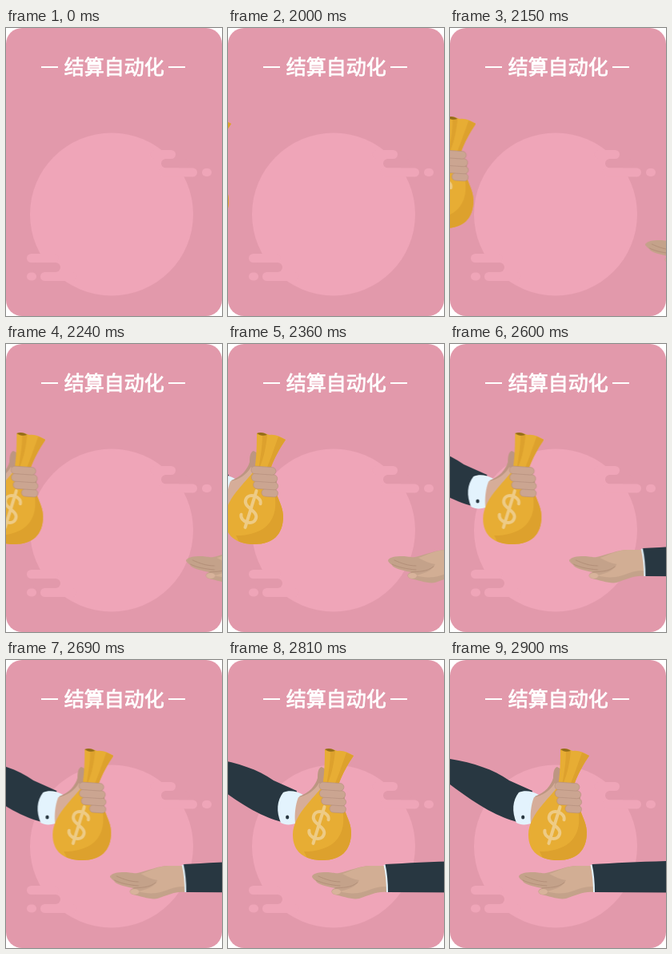
Animation, 270 px wide and 361 px high, one loop 4.57 s. Source, as an HTML page:

```html
<!DOCTYPE html>
<html lang="zh-CN">
<head>
<meta charset="utf-8">
<title>结算自动化</title>
<style>
  html, body { margin: 0; width: 100%; height: 100%; overflow: hidden; background: #fff; }
  svg { display: block; width: 100%; height: 100%; }
  .title { font: 25px "Noto Sans CJK SC", "Noto Sans CJK", sans-serif; fill: #fff; stroke: #fff; stroke-width: .8; }
  .card { fill: #e299ab; }
  .glow { fill: #efa5b8; }
  .suit { fill: #283741; }
  .cuff { fill: #e3f3fd; }
  .skin { fill: #d2ae94; }
  .wrist { fill: #d6ad99; }
  .shade { fill: #c4a28a; }
  .back { fill: #bd9682; }
  .crease { fill: none; stroke: #b18e78; stroke-width: .9; stroke-linecap: round; }
  .fingers rect { fill: #cba591; stroke: #b58f7d; stroke-width: .6; }
  .gold { fill: #e7ad34; }
  .goldShade { fill: #dda12d; }
  .dollar { fill: none; stroke: #eecb85; stroke-width: 4; stroke-linecap: round; }
</style>
</head>
<body>
<svg viewBox="0 0 270 361">
  <defs>
    <clipPath id="cardClip"><rect width="270" height="361" rx="20"/></clipPath>
    <clipPath id="bagClip"><use href="#bagBody"/></clipPath>
    <path id="bagBody" d="M136 156C131 168 98 192 98 219C98 241 113 251 135 251C158 251 171 239 171 216C171 200 158 186 154 156Z"/>
  </defs>

  <g clip-path="url(#cardClip)">
    <rect class="card" width="270" height="361"/>
    <circle class="glow" cx="132" cy="233.5" r="102"/>

    <!-- clouds on the rim of the circle -->
    <rect class="card" x="194" y="164" width="36" height="11.5" rx="5.7"/>
    <g class="glow">
      <rect x="180" y="153" width="32" height="11" rx="5.5"/>
      <rect x="190" y="175.5" width="49" height="11" rx="5.5"/>
      <rect x="245" y="176" width="12" height="10" rx="5"/>
    </g>
    <rect class="card" x="32" y="294" width="36" height="12" rx="6"/>
    <g class="glow">
      <rect x="26" y="283" width="40" height="11" rx="5.5"/>
      <rect x="43" y="306" width="46" height="11" rx="5.5"/>
      <rect x="26" y="306.5" width="12" height="10" rx="5"/>
    </g>

    <path d="M44 49H65M203 49H224" stroke="#fff" stroke-width="2"/>
    <text class="title" x="135.3" y="58.3" text-anchor="middle">结算自动化</text>

    <g id="giver">
      <path class="suit" d="M0 124C30 129 54 137 74 151L103 164L98 190L84 203C62 197 38 185 0 156Z"/>
      <path class="cuff" d="M86 166C93 163 103 164 111 169C104 178 102 192 101 205C95 207 88 207 83 204C77 190 78 176 86 166Z"/>
      <ellipse class="suit" cx="91.2" cy="197" rx="2.1" ry="2.6"/>
      <path class="back" d="M106 171C119 166 126 158 129 148C129 141 130 135 134 134L141 138L139 168L116 186Z"/>
      <path class="wrist" d="M105 172C116 170 125 164 131 154L138 166L114 192L101 205C100 194 101 182 105 172Z"/>

      <path class="gold" d="M138 112C145 110 150 113 154 114C161 113 167 116 174 120C167 130 160 143 156 154L155 164L134 162C137 150 138 134 138 112Z"/>
      <use href="#bagBody" class="gold"/>
      <g clip-path="url(#bagClip)">
        <path class="goldShade" d="M158 178C169 217 152 240 112 240L120 257H178V178Z"/>
      </g>
      <path class="goldShade" d="M165 116L174 120C167 130 160 143 156 154L150 157C156 142 160 130 165 116ZM145 114L151 115C149 132 146 146 140 158C142 144 145 130 145 114Z"/>
      <path d="M138 112C142 110 148 111 151 114C147 115.5 142 115 138 112Z" fill="#946d18"/>

      <g class="dollar" transform="translate(130.5 207) rotate(17)">
        <path d="M9.5-10C9-19-9.5-20-9.5-9C-9.5 1 9.5-1 9.5 9C9.5 20-9 19-9.5 10M0-24V24"/>
      </g>

      <path class="back" d="M140 156H156L163 172L162 188H150Z"/>
      <g class="fingers" transform="rotate(4 148 172)">
        <rect x="145" y="181.5" width="20.5" height="9.5" rx="4.7"/>
        <rect x="134" y="172.5" width="31" height="9.5" rx="4.7"/>
        <rect x="131" y="163" width="32.5" height="10" rx="5"/>
        <rect x="130" y="154" width="31" height="9.5" rx="4.7"/>
      </g>
    </g>

    <g id="taker">
      <path class="shade" d="M86 271C88 267 95 266 104 266C112 266 115 268 120 267C134 264 146 258 159 258L179 258V291C167 290 158 295 145 299C137 301 124 296 114 294C109 292 109 288 115 286C104 284 92 281 91 277C88 275 86 273 86 271Z"/>
      <path class="skin" d="M124 268C136 264 147 258 159 258L179 258V284C166 283 156 290 144 292C135 293 127 292 120 290C132 288 141 284 145 276C139 275 131 272 124 268Z"/>
      <path class="crease" d="M91 276C99 280 109 282 121 283M94 271C103 275 111 278 121 278M115 286C124 285 134 286 143 279"/>
      <ellipse cx="116.5" cy="290.5" rx="5.5" ry="3.4" fill="#d8b39b"/>
      <path class="cuff" d="M175.5 257L179 256L182 291H179C179 279 178 268 175.5 257Z"/>
      <path class="suit" d="M177.5 256C205 254.5 235 253 270 252V291.5L181 291C181 279 180 267 177.5 256Z"/>
    </g>
  </g>
</svg>

<script>
  const LOOP = 4570, ENTER = 1999.5, ARRIVE = 2899.5, STEPS = 30;

  // Parked out of sight, then an even, stepped slide into place.
  function slideIn(id, from) {
    const at = (x, ms, easing = 'linear') =>
      ({ transform: `translateX(${x}px)`, offset: ms / LOOP, easing });
    document.getElementById(id).animate([
      at(Math.sign(from) * 300, 0, 'step-end'),
      at(from, ENTER, `steps(${STEPS}, end)`),
      at(0, ARRIVE),
      at(0, LOOP)
    ], { duration: LOOP, iterations: Infinity });
  }

  slideIn('giver', -170);
  slideIn('taker', 190);
</script>
</body>
</html>
```
